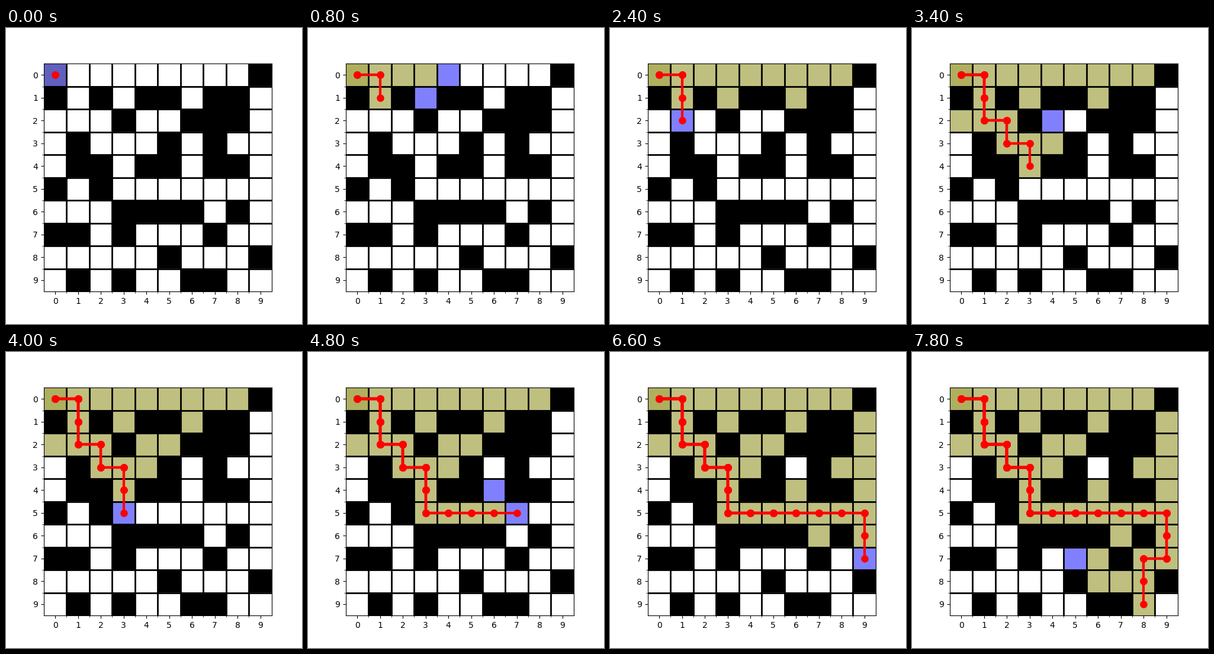
Recreate the animation shown at these times as a matplotlib script. Size 500 by 500 pixels, loop 8 s.

```python
import matplotlib.pyplot as plt
import numpy as np
from matplotlib.animation import FuncAnimation

FRAMES, INTERVAL = 40, 200
START, GOAL = (0, 0), (9, 9)
MAZE = [
    ".........#",
    "#.#.##.##.",
    "...#..###.",
    ".#...#.#..",
    ".##.##.##.",
    "#.#.......",
    "...####.#.",
    "##.#...#..",
    ".....#...#",
    ".#.#..##..",
]
SIZE = len(MAZE)
STEPS = [(1, 0), (-1, 0), (0, -1), (0, 1)]

NEW, OLD = (128, 128, 255), (191, 191, 128)
START_NEW, START_OLD = (96, 96, 191), (175, 175, 96)


def is_open(r, c):
    return 0 <= r < SIZE and 0 <= c < SIZE and MAZE[r][c] == "."


def search():
    """Depth-first search: the step at which each cell is found, and its parent."""
    found, parent, stack, step = {START: 0}, {START: None}, [START], 0
    while stack and GOAL not in found:
        step += 1
        r, c = cell = stack.pop()
        for dr, dc in STEPS:
            nxt = (r + dr, c + dc)
            if is_open(*nxt) and nxt not in found:
                found[nxt], parent[nxt] = step, cell
                stack.append(nxt)
    return found, parent


def trace(parent):
    path, cell = [], GOAL
    while cell is not None:
        path.append(cell)
        cell = parent[cell]
    return path[::-1]


found, parent = search()
path = [cell for cell in trace(parent) if found[cell] < FRAMES]
base = np.array([[[255 * (ch == ".")] * 3 for ch in row] for row in MAZE], dtype=np.uint8)

fig, ax = plt.subplots(figsize=(5, 5), dpi=100)
image = ax.imshow(base, interpolation="nearest")
ax.set_xticks(range(SIZE))
ax.set_yticks(range(SIZE))
ax.set_xticks(np.arange(0.5, SIZE - 1), minor=True)
ax.set_yticks(np.arange(0.5, SIZE - 1), minor=True)
ax.grid(which="minor", color="black", linewidth=2)

# The trail is stacked: each new cell adds a line over the whole path so far.
trails = []
for n in [1] + list(range(1, len(path) + 1)):
    rows, cols = zip(*path[:n])
    line, = ax.plot(cols, rows, "ro-", linewidth=3, markersize=8)
    trails.append((found[path[n - 1]], line))
ax.set_xlim(-0.5, SIZE - 0.5)
ax.set_ylim(SIZE - 0.5, -0.5)


def update(i):
    cells = base.copy()
    for cell, step in found.items():
        if step <= i:
            new, old = (START_NEW, START_OLD) if cell == START else (NEW, OLD)
            cells[cell] = new if step == i else old
    image.set_data(cells)
    for step, line in trails:
        line.set_visible(step <= i)
    return [image] + [line for _, line in trails]


anim = FuncAnimation(fig, update, frames=FRAMES, interval=INTERVAL,
                     init_func=lambda: update(0), repeat=True, repeat_delay=0)
plt.show()
```
